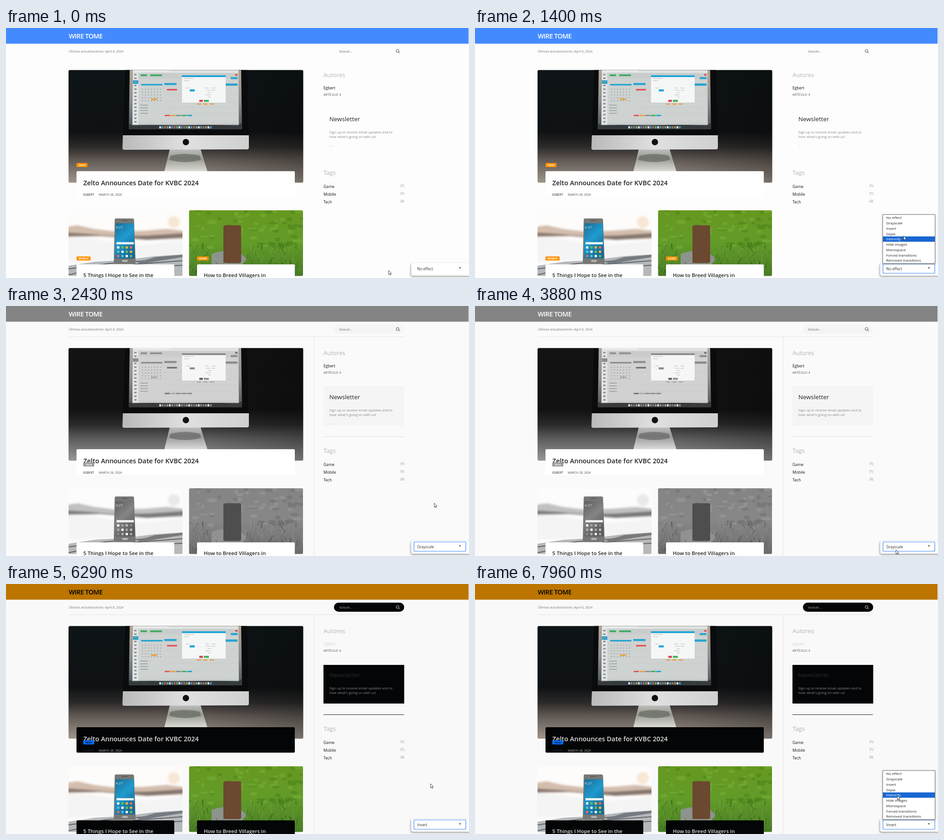
Write an HTML page that moves like this. It is 1018 px wide and 550 px high and loops after 8000 ms.

```html
<!DOCTYPE html>
<html lang="es">
<head>
<meta charset="utf-8">
<title>Blog effects</title>
<style>
html, body { margin: 0; width: 100%; height: 100%; overflow: hidden; }
svg {
  display: block; width: 1018px; height: 550px;
  font-family: "Open Sans", "Noto Sans", sans-serif;
  --bg: #fdfdfd; --bar: #448aff; --brand: #fff; --line: #fdfdfd; --rule: #fdfdfd;
  --card: #fff; --title: #222; --author: #222; --date: #777; --pill: #fdfdfd; --hint: #666;
  --box: #fdfdfd; --boxTitle: #222; --name: #111; --tag: #ff9100; --tagText: #fff;
  --head: #aeb3b9; --count: #5d8587;
}
svg.gray {
  --bg: #fafafa; --bar: #848484; --line: #e4e4e4; --rule: #e0e0e0; --pill: #f5f5f5;
  --box: #f5f5f5; --tag: #999; --head: #b2b2b2; --count: #777;
}
svg.invert {
  --bg: #f9f9f9; --bar: #bb7500; --brand: #000; --line: #e4e4e4; --rule: #222; --card: #040506;
  --title: #ddd; --author: #272727; --date: #8d8d8d; --pill: #040506; --hint: #aaa;
  --box: #040506; --boxTitle: #2b2b2b; --name: #d4d4d4; --tag: #006eff; --tagText: #000;
  --count: #777;
}
.gray .photo { filter: grayscale(1); }
.b { font-weight: 600; }
.m { font-weight: 500; }
.shadow { filter: drop-shadow(-1px 2px 2px rgba(0, 0, 0, .4)); }
.soft { filter: drop-shadow(0 1px 2px rgba(0, 0, 0, .3)); }
.blur { filter: blur(2px); }
</style>
</head>
<body>
<svg id="stage" viewBox="0 0 1018 550">
  <defs>
    <clipPath id="heroClip"><rect x="137.500" y="92.500" width="516" height="247.800" rx="3"/></clipPath>
    <clipPath id="phoneClip"><rect x="137.500" y="401" width="250.500" height="144.500" rx="3"/></clipPath>
    <clipPath id="grassClip"><rect x="402.500" y="401" width="250.500" height="144.500" rx="3"/></clipPath>
    <linearGradient id="room" x2="0" y2="1">
      <stop offset="0" stop-color="#0e1417"/><stop offset=".55" stop-color="#0f1214"/>
      <stop offset=".68" stop-color="#2c2a29"/><stop offset=".8" stop-color="#625a55"/><stop offset="1" stop-color="#a0968c"/>
    </linearGradient>
    <linearGradient id="dim"><stop offset=".6" stop-opacity="0"/><stop offset="1" stop-opacity=".25"/></linearGradient>
    <linearGradient id="desk" x2="0" y2="1"><stop offset="0" stop-color="#b5a794"/><stop offset=".5" stop-color="#8d8f90"/><stop offset="1" stop-color="#4c555b"/></linearGradient>
    <linearGradient id="chin"><stop offset="0" stop-color="#b9bab9"/><stop offset=".5" stop-color="#dfe0df"/><stop offset="1" stop-color="#cfd0cf"/></linearGradient>
    <linearGradient id="foot" x2="0" y2="1">
      <stop offset="0" stop-color="#bcbdb9"/><stop offset=".4" stop-color="#979a92"/><stop offset="1" stop-color="#dedcd6"/>
    </linearGradient>
    <linearGradient id="sea" x2=".5" y2="1"><stop offset="0" stop-color="#1c6d96"/><stop offset=".5" stop-color="#1f9bce"/><stop offset="1" stop-color="#176a98"/></linearGradient>
    <linearGradient id="lawn" x2="0" y2="1"><stop offset="0" stop-color="#66981f"/><stop offset=".5" stop-color="#639b29"/><stop offset="1" stop-color="#487a26"/></linearGradient>
  </defs>
  <rect width="1018" height="550" fill="var(--bg)"/>
  <rect width="1017" height="34.500" fill="var(--bar)"/>
  <path d="M138 67.500H875M677.500 67V550M698 178H875" stroke="var(--line)"/>
  <rect x="721" y="41" width="154.500" height="20" rx="10" fill="var(--pill)"/>
  <g fill="none" stroke="var(--hint)" stroke-width="1.100"><circle cx="861" cy="50.500" r="3"/><path d="M863.200 52.700l2.300 2.300"/></g>
  <rect x="698" y="178" width="177.500" height="85" fill="var(--box)"/>
  <path d="M698 287.500H875" stroke="var(--rule)"/>

  <g class="photo" clip-path="url(#heroClip)">
    <path d="M137 92h517v249H137z" fill="url(#room)"/>
    <path d="M137 92h517v249H137z" fill="url(#dim)"/>
    <path d="M262 92H530L533 237H257z" fill="#0a0b0d"/>
    <path d="M272 92H517L519 223H270z" fill="url(#desk)"/>
    <path d="M270 223l1-12 8 4 40-2 60 3 70-4 60 3 9-6 1 14z" fill="#353b3d"/>
    <path d="M279 92H511L512 213H278z" fill="#c8cccb"/>
    <path d="M279 99H291V213H278z" fill="#dfe3e3"/>
    <path d="M291 111H511v97H291z" fill="#ced2d1"/>
    <g id="app"></g>
    <path d="M387 104h96v60h-96z" fill="#f5f6f6"/>
    <path d="M387 104h96v4h-96z" fill="#20a4d8"/>
    <path d="M404 135h11v4.500h-11z" fill="#20a4d8"/>
    <path d="M425 158h8v4.500h-8z" fill="#e0405a"/>
    <path d="M435 158h11v4.500h-11z" fill="#44b55c"/>
    <path d="M391 111h22M391 116h12M396 132h8M438 132h8M452 132h9M440 137h10M452 137h8M443 142h8M438 147h12M444 152h6" stroke="#b4b8ba"/>
    <path d="M360 267H428L443 316H348z" fill="url(#foot)"/>
    <path d="M362 281q32-8 64 0l3 9q-34 10-70 0z" fill="#555a51" opacity=".55"/>
    <path d="M257 236H534V263q0 4-4 4L260 268q-4 0-4-4z" fill="url(#chin)"/>
    <circle cx="395.500" cy="251" r="7" fill="#111"/>
  </g>

  <g class="photo" clip-path="url(#phoneClip)">
    <path d="M137 401h251v145H137z" fill="#fdfcfb"/>
    <g class="blur">
      <path d="M130 438l28-4 35 8 50 6 60-2 50-4 45 5v16l-90 3-100-8-80 2z" fill="#d3bdad"/>
      <path d="M130 450l50 3 60 5 70-1 90-6v9l-90 6-100-9-80 1z" fill="#84766f"/>
      <circle cx="369" cy="427" r="13" fill="#f7e7d3"/>
      <path d="M130 461q60 0 108 11t160-7v40l-130 5-140 5z" fill="#f4f4f5"/>
    </g>
    <path d="M137 523l60-9 60-3 70-9 62-4v50H137z" fill="#b5b8bb"/>
    <path d="M137 530l90-12 70-5 92-13M137 543l100-22M280 520l108-8M310 526l78-4" stroke="#5c6267" stroke-width="2" fill="none"/>
    <path d="M288 516l40-12 60-5v5l-50 8-40 7z" fill="#747a80"/>
    <path d="M242 419H278q3 0 3.500 3L285 515q0 4-3 4H240q-3 0-3-4l2-93q0-3 3-3z" fill="#777775"/>
    <path d="M241 429.500H281L283.500 507H239.500z" fill="url(#sea)"/>
    <path d="M254 423.500h13" stroke="#444"/>
    <rect x="255" y="510.500" width="13" height="4" rx="2" fill="#b9b9b8"/>
    <path d="M243 471h38v5h-38z" fill="#e9f1f3"/>
    <g id="icons"></g>
    <text x="241" y="441" font-size="8" fill="#cfe6ee">4:27</text>
  </g>

  <g class="photo" clip-path="url(#grassClip)">
    <path d="M402 401h251v145H402z" fill="url(#lawn)"/>
    <g id="leaves"></g>
    <path d="M452 497q30-12 62-3l16 14-12 14h-66z" fill="#8d938d"/>
    <g id="blades" fill="none" opacity=".7"></g>
    <rect x="478" y="434" width="39" height="83" rx="4" fill="#6b4830"/>
  </g>

  <g fill="var(--card)">
    <rect x="155" y="315" width="480" height="56" rx="2.500"/>
    <rect x="155" y="520" width="215" height="40" rx="2.500"/>
    <rect x="420" y="520" width="215" height="40" rx="2.500"/>
  </g>
  <g id="words"></g>
  <g id="techTag"></g>
  <g id="otherTags"></g>

  <rect class="shadow" x="891" y="517" width="140" height="28" rx="4" fill="#fff"/>
  <rect id="focus" x="897" y="519" width="114" height="20.500" rx="1" fill="#fff" stroke="#4285f4" stroke-width="1.200"/>
  <text id="choice" x="904" y="532.500" font-size="8.200" fill="#333"></text>
  <path d="M995.500 526h5l-2.500 4.500z" fill="#777"/>
  <g id="menu">
    <rect class="soft" x="896.500" y="410.500" width="115" height="107.500" fill="#fff" stroke="#777"/>
    <rect id="pick" x="897" width="114" height="11.750" fill="#1967d2"/>
    <g id="items"></g>
  </g>
  <path id="cursor" d="M.5 .5V9.500L2.600 7.600 4 10.700 5.300 10.100 4 7.100H6.700z" fill="#fff" stroke="#222" stroke-width=".8"/>
</svg>
<script>
const $ = id => document.getElementById(id);
const text = (x, y, size, fill, str, more = '') =>
  `<text x="${x}" y="${y}" font-size="${size}" fill="${fill}" ${more}>${str}</text>`;
const rect = (x, y, w, h, fill, more = '') =>
  `<rect x="${x}" y="${y}" width="${w}" height="${h}" fill="${fill}" ${more}/>`;
const many = (n, make) => Array.from({ length: n }, (_, i) => make(i)).join('');
const B = 'class="b"', M = 'class="m"', END = 'text-anchor="end"';

// page text
$('words').innerHTML = [
  [138, 23, 14.4, 'var(--brand)', 'WIRE TOME', B + ' letter-spacing="-.6"'],
  [138, 54, 7, '#777', 'Últimas actualizaciónes: April 6, 2024'],
  [733, 53.5, 7.4, 'var(--hint)', 'buscar...'],
  [170, 346, 14.4, 'var(--title)', 'Zelto Announces Date for KVBC 2024', B],
  [170, 368.700, 6.5, 'var(--author)', 'EGBERT'],
  [204, 368.700, 6.5, 'var(--date)', 'MARCH 26, 2024', B],
  [170, 547.5, 11.3, 'var(--title)', '5 Things I Hope to See in the', B],
  [435, 547.5, 11.3, 'var(--title)', 'How to Breed Villagers in', B],
  [698, 107.5, 13.2, 'var(--head)', 'Autores', M],
  [698, 135, 8.6, 'var(--name)', 'Egbert', M],
  [698, 148.5, 6.5, '#777', 'ARTÍCULO: 4', B],
  [711, 205, 13.4, 'var(--boxTitle)', 'Newsletter', M],
  [711, 232, 7.57, '#888', 'Sign up to receive email updates and to'],
  [711, 242, 7.57, '#888', 'hear what\'s going on with us!'],
  [711, 260, 7.57, '#888', '...'],
  [698, 323, 13.2, 'var(--head)', 'Tags', M],
  ...[['Game', 1], ['Mobile', 1], ['Tech', 2]].flatMap(([name, n], i) => [
    [698, 352 + i * 17.2, 8.7, '#111', name, M],
    [875.5, 349 + i * 17.2, 6.8, 'var(--count)', `(${n})`, END]
  ])
].map(a => text(...a)).join('');

const badge = (x, y, w, str) => rect(x, y, w, 9, 'var(--tag)', 'rx="1.500"') +
  text(x + w / 2, y + 6.7, 5.7, 'var(--tagText)', str, 'font-weight="700" text-anchor="middle"');
$('techTag').innerHTML = badge(155, 297, 24, 'TECH');
$('otherTags').innerHTML = badge(155, 502.5, 31, 'MOBILE') + badge(420, 502.5, 25.5, 'GAME');

// calendar app on the monitor
const hues = ['#43ad63', '#2aa5cf', '#e0555a', '#e8a33d', '#8a9197'];
$('app').innerHTML =
  rect(279, 93, 232, 6, '#dde2e2') + rect(279, 93, 80, 2.5, '#eef0f0') +
  rect(296, 102, 14, 4, hues[0]) + rect(317, 102, 26, 4, hues[0]) +
  rect(494, 108, 15, 4.5, hues[1]) + rect(504, 101, 5, 4, hues[2]) +
  rect(279, 115, 12, 8, hues[1]) + rect(297, 123, 47, 3.5, hues[1]) +
  rect(348, 121, 27, 4.5, hues[1]) + rect(481, 122, 28, 5, hues[1]) +
  rect(354, 134, 22, 3.5, hues[2]) + rect(319, 155, 13, 3.5, hues[3]) +
  many(14, i => rect(282, 101 + i * 8, 5, 3, '#858d91')) +
  many(35, i => rect(299 + i % 7 * 6.6, 134 + (i / 7 | 0) * 6.3, 2, 1.3, '#7d8588')) +
  many(4, i => rect(349, 146 + i * 14, 160, .5, '#bcc1c1')) +
  many(4, i => rect(295, 169 + i * 6, 17, 1.2, '#858c8f')) +
  many(5, i => rect(349 + i * 12.3, 191, 11, 3, hues[(i + 2) % 5])) +
  many(3, i => rect(420 + i * 14, 166, 9, 2.5, hues[3])) +
  many(22, i => rect(337 + i * 5.3, 216, 4, 5, ['#d5dde2', '#4f8fc0', '#b5654f', '#71a070'][i % 4], 'rx="1"'));

$('icons').innerHTML = many(12, i => rect(244 + i % 4 * 9.4, 480 + (i / 4 | 0) * 9.5, 5.5, 5.5,
  ['#f4f4f0', '#e6b53c', '#4fc0e0', '#58bd68', '#ed6b52'][i * 3 % 5], 'rx="1.700"'));

// lawn
let seed = 7;
const rnd = (lo, hi) => lo + (hi - lo) * ((seed = seed * 16807 % 2147483647) / 2147483647);
$('leaves').innerHTML = many(70, i => `<ellipse cx="${rnd(403, 653)}" cy="${rnd(401, 485)}" rx="${rnd(3, 11)}" ry="${rnd(2, 5)}" fill="${i % 2 ? '#75ad35' : '#4c851d'}" opacity=".6"/>`);
$('blades').innerHTML = many(200, i => {
  const x = rnd(403, 653), y = rnd(482, 546);
  return x > 447 && x < 527 && y < 524 ? '' :
    `<path d="M${x} ${y}q${rnd(-3, 3)} -7 ${rnd(-8, 8)} ${rnd(-15, -7)}" stroke="${['#23490f', '#649d31', '#3d7520', '#82ac4e'][i % 4]}"/>`;
});

// effect menu
const effects = ['No effect', 'Grayscale', 'Invert', 'Sepia', 'Intensify', 'Hide images',
  'Monospace', 'Forced transitions', 'Removed transitions'];
const TOP = 411.5, ROW = 11.75;
$('items').innerHTML = effects.map((s, i) => text(904, TOP + 8.9 + i * ROW, 8, '#222', s)).join('');

// cursor path: time, x, y
const path = [
  [0, 841, 533], [70, 841, 533], [170, 847, 533], [340, 847, 533], [960, 935, 531],
  [1150, 935, 531], [1400, 942, 457.5], [1770, 941, 433], [3410, 941, 433], [3880, 925, 536],
  [4200, 925, 535], [4850, 935, 442], [4960, 935, 442], [4990, 935, 439], [5030, 935, 439],
  [5210, 935, 436], [5720, 935, 436], [5750, 934, 436], [5920, 934, 436], [6080, 933, 438.5],
  [6810, 933, 438.5], [7070, 919, 534], [7280, 919, 534], [7350, 919, 532], [7740, 919, 532],
  [7960, 928, 465], [8000, 928, 465]
];
const opened = [[1060, 2200], [4020, 6290], [7550, 8000]];

function cursorAt(t) {
  const i = path.findIndex(p => p[0] > t), [a, b] = [path[i - 1], path[i]];
  const u = (t - a[0]) / (b[0] - a[0]), k = u * u * (3 - 2 * u);
  return [a[1] + (b[1] - a[1]) * k, a[2] + (b[2] - a[2]) * k];
}

function draw() {
  const t = performance.now() % 8000;
  const mode = t < 2200 ? 0 : t < 6290 ? 1 : 2;
  const [x, y] = cursorAt(t);
  const open = opened.some(([a, b]) => t >= a && t < b);
  const row = y < 517 ? Math.floor((y + 1.5 - TOP) / ROW) : mode;
  $('stage').setAttribute('class', ['', 'gray', 'invert'][mode]);
  $('techTag').setAttribute('transform', mode ? 'translate(15 47)' : '');
  $('otherTags').setAttribute('visibility', mode ? 'hidden' : 'visible');
  $('focus').setAttribute('visibility', t < 1060 ? 'hidden' : 'visible');
  $('choice').textContent = effects[mode];
  $('menu').setAttribute('visibility', open ? 'visible' : 'hidden');
  $('pick').setAttribute('y', TOP + row * ROW);
  [...$('items').children].forEach((e, i) => e.setAttribute('fill', i === row ? '#fff' : '#222'));
  $('cursor').setAttribute('transform', `translate(${Math.round(x)} ${Math.round(y)})`);
  requestAnimationFrame(draw);
}
draw();
</script>
</body>
</html>
```
